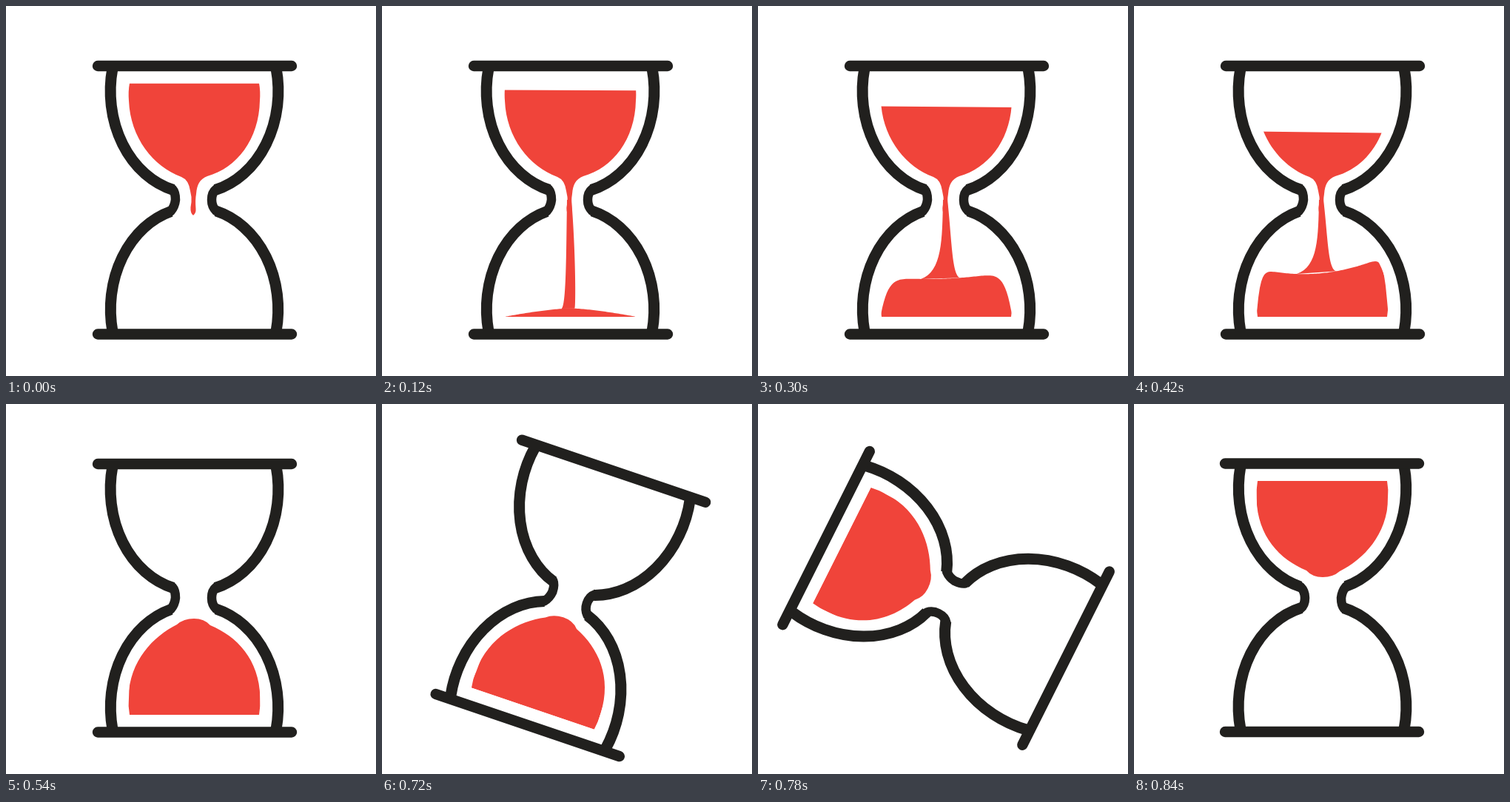
Write an HTML page with a canvas that moves like this. It is 500 px wide and 500 px high and loops after 930 ms.

```html
<!DOCTYPE html>
<html>
<head>
<meta charset="utf-8">
<style>
html, body { margin: 0; height: 100%; overflow: hidden; background: #fff; }
canvas { display: block; }
</style>
</head>
<body>
<canvas id="stage" width="500" height="500"></canvas>
<script>
const ctx = document.getElementById('stage').getContext('2d');
const LOOP = 930, STEP = 30, DRAINED = 18;
const CX = 254.5, CY = 262, FLOOR = 420, RADIUS = 89;
const INK = '#21201e', RED = '#f0443a';

const bars = new Path2D('M124 81H386M124 443.5H386');
const bulbs = new Path2D(
  'M144 84A113.3 138 0 0 0 226 248.5M223 277.5A113.3 138 0 0 0 144 440' +
  'M365 84A113.3 138 0 0 1 283 248.5M284 277A113.3 138 0 0 1 365 440');
const neck = new Path2D(
  'M225 247.5Q229 252 229 262Q228 271 222.5 277.5M284 247.5Q278 252 278 262Q278 271 284 277');
const upperSand = new Path2D(
  'M167 104.5Q165 115 166 128C168 178 199 217 237 231Q247 235 249 250L250.5 258Q251 264 249.5 272' +
  'Q249 280 253 283Q257 280 256.5 274Q255.5 262 257 254Q258 235 272 230C312 219 342 180 343 128Q344 115 342 104.5Z');
const dome = new Path2D(
  'M167 420Q165 408 165.5 396C167 347 199 314 231 298Q240 290 254 290' +
  'Q268 290 276 299C312 314 342 345 343.5 396Q344 408 342 420Z');

const clamp = u => Math.min(Math.max(u, 0), 1);
const smooth = u => u * u * (3 - 2 * u);

function drawUpperSand(k) {
  const level = 104.5 + 2.2 * k + 0.00089 * k ** 4;
  ctx.save();
  ctx.beginPath();
  ctx.moveTo(160, level);
  ctx.lineTo(350, level + k / 6);
  ctx.lineTo(350, 300);
  ctx.lineTo(160, 300);
  ctx.clip();
  ctx.fill(upperSand);
  ctx.restore();
}

// Top of the heap: rises in three phases, flattens out and grows a lopsided swell
function surface(x, k) {
  const u = (x - CX) / RADIUS, swell = Math.max(0, (k - 7) / 7);
  const height = 46 * clamp((k - 3) / 4) + 13 * clamp(swell) + 76 * clamp((k - 14) / 4);
  const profile = Math.max(0, 1 - Math.abs(u) ** (k * k / 11));
  return FLOOR - (height + swell * (9 * u + 16 * u * u)) * profile;
}

function drawHeap(k) {
  ctx.save();
  ctx.clip(dome);
  ctx.beginPath();
  ctx.moveTo(160, FLOOR);
  for (let x = 160; x <= 350; x += 2) ctx.lineTo(x, surface(x, k));
  ctx.lineTo(350, FLOOR);
  ctx.fill();
  ctx.restore();
}

function drawStream(k) {
  const flare = clamp((k - 3) / 4), tip = 262 + 53 * k;
  const left = 250 - 30 * flare, right = 256 + 18 * flare;
  const leftY = Math.min(tip, surface(left, k)), rightY = Math.min(tip, surface(right, k));
  ctx.beginPath();
  ctx.moveTo(250, 262);
  ctx.bezierCurveTo(249, (262 + leftY) / 2, 249, leftY - 10 * flare, left, leftY);
  ctx.lineTo(right, rightY);
  ctx.bezierCurveTo(262, rightY, 262, (262 + rightY) / 2, 256, 262);
  ctx.fill();
}

function outline(path, width, cap) {
  ctx.lineWidth = width;
  ctx.lineCap = cap;
  ctx.stroke(path);
}

function draw() {
  const tick = Math.floor(performance.now() % LOOP / STEP);
  const k = Math.min(tick, DRAINED);

  ctx.clearRect(0, 0, 500, 500);
  ctx.save();
  ctx.translate(CX, CY);
  ctx.rotate(Math.PI * smooth(clamp((tick - 23) / 5)));
  ctx.translate(-CX, -CY);

  ctx.fillStyle = RED;
  if (k < DRAINED) {
    drawUpperSand(k);
    drawStream(k);
  }
  drawHeap(k);

  ctx.strokeStyle = INK;
  ctx.lineJoin = 'round';
  outline(bulbs, 15, 'butt');
  outline(neck, 12.5, 'round');
  outline(bars, 14.4, 'round');
  ctx.restore();
  requestAnimationFrame(draw);
}
draw();
</script>
</body>
</html>
```
